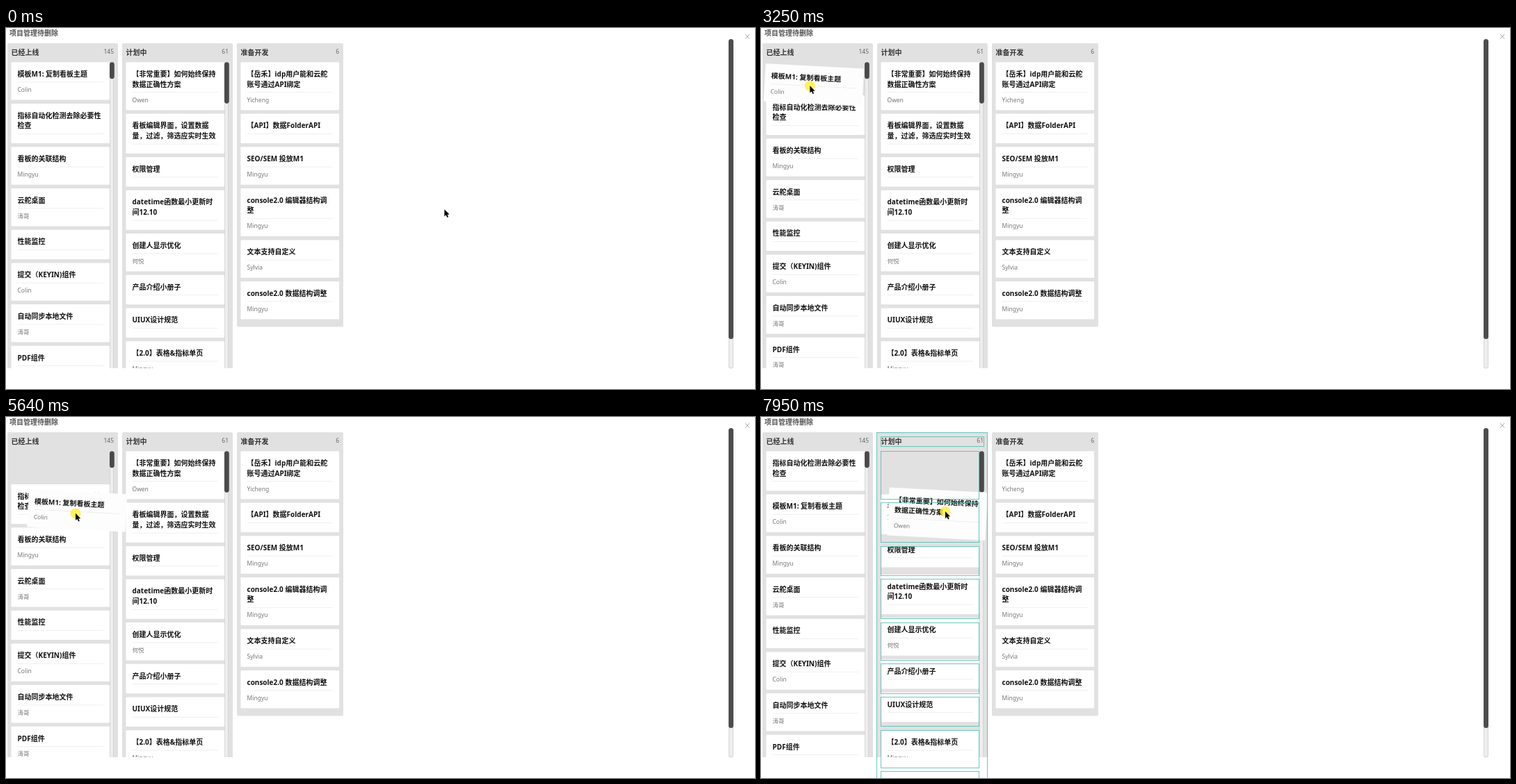
Animation, 1077 px wide and 520 px high, one loop 7.99 s. Source, as an HTML page with a canvas:

```html
<!DOCTYPE html>
<html lang="zh-CN">
<head>
<meta charset="utf-8">
<style>
  html, body { margin: 0; width: 100%; height: 100%; overflow: hidden; background: #fff; }
  canvas { display: block; width: 1077px; height: 520px; }
</style>
</head>
<body>
<canvas id="stage"></canvas>
<script>
const W = 1077, H = 520, LOOP = 7990, BOTTOM = 490;
const FONT = '"Noto Sans", "Noto Sans CJK SC", "Noto Sans CJK", sans-serif';
const CARD_W = 141.6, GAP = 5.3, LINE = 14.7, NAME_H = 12, TOP = 49.2;
const GRAB_1 = 2080, DROP_1 = 6600, GRAB_2 = 7780;

const canvas = document.getElementById('stage');
const ctx = canvas.getContext('2d');
const dpr = window.devicePixelRatio || 1;
canvas.width = W * dpr;
canvas.height = H * dpr;

const card = (title, name) => ({ lines: title.split('\n'), name });
const columns = [
  { x: 2, w: 159, bottom: BOTTOM, title: '已经上线', count: '145', thumb: 24, cards: [
    card('模板M1: 复制看板主题', 'Colin'),
    card('指标自动化检测去除必要性\n检查'),
    card('看板的关联结构', 'Mingyu'),
    card('云舵桌面', '涛哥'),
    card('性能监控'),
    card('提交（KEYIN)组件', 'Colin'),
    card('自动同步本地文件', '涛哥'),
    card('PDF组件', '涛哥'),
    card('')
  ] },
  { x: 167, w: 159, bottom: BOTTOM, title: '计划中', count: '61', thumb: 59.5, cards: [
    card('【非常重要】如何始终保持\n数据正确性方案', 'Owen'),
    card('看板编辑界面，设置数据\n量，过滤，筛选应实时生效'),
    card('权限管理'),
    card('datetime函数最小更新时\n间12.10'),
    card('创建人显示优化', '何悦'),
    card('产品介绍小册子'),
    card('UIUX设计规范'),
    card('【2.0】表格&指标单页', 'Mingyu'),
    card('')
  ] },
  { x: 332, w: 153, bottom: 430.5, title: '准备开发', count: '6', cards: [
    card('【岳禾】idp用户能和云舵\n账号通过API绑定', 'Yicheng'),
    card('【API】数据FolderAPI'),
    card('SEO/SEM 投放M1', 'Mingyu'),
    card('console2.0 编辑器结构调\n整', 'Mingyu'),
    card('文本支持自定义', 'Sylvia'),
    card('console2.0 数据结构调整', 'Mingyu')
  ] }
];

// time, x, y of the pointer tip
const pointerPath = [
  [0, 630, 261], [500, 630, 261], [1330, 82, 126], [1750, 76, 81], [2300, 76, 81],
  [2860, 74, 79], [3000, 81, 79], [3250, 70, 83], [3450, 68, 121], [3630, 75, 165],
  [3900, 69, 90], [4440, 83, 231], [4930, 104, 306], [4990, 104.5, 306],
  [5260, 105, 209], [6090, 86, 82], [6230, 78.5, 72], [6520, 99.5, 110],
  [6900, 99.5, 110], [7600, 254, 80], [7760, 254, 80], [7950, 264.5, 135.5], [7990, 266, 140]
];
// time and offset from the pointer to the middle of the held card
const holdPath1 = [[2080, 2, -5], [3250, 6, -1], [4970, 1.8, -5], [6230, 3, -3], [6600, 2, -5]];
const holdPath2 = [[7780, -11, 4], [7990, -11, 4]];

const height = (c, bare) => 27.7 + c.lines.length * LINE + (c.name && !bare ? NAME_H : 0);

// Monotone cubic through the key points
function follow(path, t) {
  const last = path.length - 1;
  if (t <= path[0][0]) return path[0].slice(1);
  if (t >= path[last][0]) return path[last].slice(1);
  let i = 0;
  while (path[i + 1][0] < t) i++;
  const slope = (k, a) => (path[k + 1][a] - path[k][a]) / (path[k + 1][0] - path[k][0]);
  const tangent = (k, a) => {
    if (k === 0 || k === last) return 0;
    const p = slope(k - 1, a), q = slope(k, a);
    return p * q <= 0 ? 0 : 2 * p * q / (p + q);
  };
  const d = path[i + 1][0] - path[i][0], u = (t - path[i][0]) / d;
  return [1, 2].map(a =>
    (1 + 2 * u) * (1 - u) ** 2 * path[i][a] + u * (1 - u) ** 2 * d * tangent(i, a) +
    u * u * (3 - 2 * u) * path[i + 1][a] + u * u * (u - 1) * d * tangent(i + 1, a));
}

function text(s, x, y, size, color, bold, align = 'left') {
  ctx.font = `${bold ? 'bold ' : ''}${size}px ${FONT}`;
  ctx.fillStyle = color;
  ctx.textAlign = align;
  ctx.fillText(s, x, y);
}

function box(x, y, w, h, r, color) {
  ctx.fillStyle = color;
  ctx.beginPath();
  ctx.roundRect(x, y, w, h, r);
  ctx.fill();
}

function clipTo(x, y, w, h) {
  ctx.beginPath();
  ctx.rect(x, y, w, h);
  ctx.clip();
}

function drawCard(c, x, y, fill = '#fff') {
  box(x, y, CARD_W, height(c), 1, fill);
  c.lines.forEach((s, i) => text(s, x + 9, y + 20.7 + i * LINE, 10, '#111', true));
  const ruleY = y + 13.7 + c.lines.length * LINE;
  ctx.fillStyle = '#ececec';
  ctx.fillRect(x + 9, ruleY, CARD_W - 18, 0.8);
  if (c.name) text(c.name, x + 9, ruleY + 14.2, 8.5, '#777');
}

// held: index of the lifted card, slot: index after which the drop gap opens,
// stale: parts of the column have not been repainted yet
function drawCards(col, { cards = col.cards, held = -1, slot = -1, stale = false }) {
  ctx.save();
  clipTo(col.x, TOP - 1, col.w, col.bottom - TOP + 1);
  let y = TOP, oldY = TOP;
  cards.forEach((c, i) => {
    const h = height(c);
    if (i !== held) {
      ctx.save();
      if (stale && i === slot) clipTo(col.x, oldY, col.w, h);
      drawCard(c, col.x + 5.5, stale && i > 6 ? oldY : y);
      ctx.restore();
    }
    y += height(c, i === held) + GAP + (i === slot ? GAP : 0);
    oldY += h + GAP;
  });
  ctx.restore();
}

function drawColumn(col, state) {
  const right = col.x + col.w;
  box(col.x, 22, col.w, col.bottom - 22, col.thumb ? [2, 2, 0, 0] : 2, '#e1e1e1');
  text(col.title, col.x + 5.5, 39.3, 10, '#333', true);
  text(col.count, right - 6, 37.2, 8.5, '#666', false, 'right');
  if (col.thumb) {
    box(right - 12, TOP, 6, BOTTOM - TOP, [3, 3, 0, 0], '#cfcfcf');
    box(right - 11.2, TOP, 4.4, BOTTOM - TOP, [2, 2, 0, 0], '#eeeeee');
  }
  drawCards(col, state);
  if (col.thumb) box(right - 12, TOP, 6.8, col.thumb, 3.4, '#4a4a4a');
}

function drawFlash(col, age) {
  if (age < 0 || age > 500) return;
  const snap = v => Math.floor(v) + 0.5;
  const outline = (x, y, w, h) =>
    ctx.strokeRect(snap(x), snap(y), snap(x + w) - snap(x), snap(y + h) - snap(y));
  ctx.save();
  ctx.globalAlpha = Math.min(1, 1.25 - age / 400);
  ctx.strokeStyle = '#4fbdb0';
  ctx.lineWidth = 1;
  outline(col.x - 0.5, 22, col.w, H);
  outline(col.x + 5.5, 28, col.w - 11.5, 14.5);
  let y = TOP;
  for (const c of col.cards) {
    outline(col.x + 5.5, y, CARD_W - 0.6, height(c));
    y += height(c) + GAP;
  }
  ctx.restore();
}

function drawHeld(c, [px, py], [dx, dy]) {
  ctx.save();
  ctx.translate(px + dx, py + dy);
  ctx.rotate(3 * Math.PI / 180);
  drawCard(c, -CARD_W / 2, -height(c) / 2, '#fdfdfd');
  ctx.restore();
}

function drawPointer([x, y], pressed) {
  if (pressed) {
    ctx.fillStyle = 'rgba(255, 238, 50, 0.78)';
    ctx.beginPath();
    ctx.arc(x + 0.3, y + 0.5, 7.5, 0, Math.PI * 2);
    ctx.fill();
  }
  const shape = [[0, 0], [0, 10.2], [2.3, 8], [4, 11.6], [5.7, 10.8], [4.1, 7.4], [7.2, 7.3]];
  ctx.fillStyle = '#000';
  ctx.beginPath();
  shape.forEach(([a, b]) => ctx.lineTo(x + a + 0.4, y + b + 0.3));
  ctx.fill();
}

function drawFrame() {
  text('项目管理待删除', 5, 10.7, 10, '#555', true);
  ctx.strokeStyle = '#999';
  ctx.lineWidth = 0.9;
  ctx.beginPath();
  ctx.moveTo(1063, 9); ctx.lineTo(1069, 15.5);
  ctx.moveTo(1069, 9); ctx.lineTo(1063, 15.5);
  ctx.stroke();
  box(1039, 16, 7, 474.5, 3.5, '#d2d2d2');
  box(1039.8, 17, 5.4, 472.5, 2.7, '#eeeeee');
  box(1039, 16, 7, 432, 3.5, '#4d4d4d');
}

function render(t) {
  const [live, plan, ready] = columns;
  const drag1 = t >= GRAB_1 && t < DROP_1, drag2 = t >= GRAB_2;
  const pointer = follow(pointerPath, t);

  ctx.setTransform(dpr, 0, 0, dpr, 0, 0);
  ctx.fillStyle = '#fff';
  ctx.fillRect(0, 0, W, H);
  drawFrame();

  const [first, second, ...rest] = live.cards;
  drawColumn(live, {
    cards: t < DROP_1 ? live.cards : [second, first, ...rest],
    held: drag1 ? 0 : -1,
    slot: drag1 && t >= 6150 ? 1 : -1
  });
  drawColumn(plan, drag2 ? { held: 0, slot: 2, stale: true } : {});
  drawColumn(ready, {});

  if (drag1) drawHeld(first, pointer, follow(holdPath1, t));
  if (drag2) drawHeld(plan.cards[0], pointer, follow(holdPath2, t));
  drawFlash(live, t - GRAB_1);
  drawFlash(live, t - DROP_1);
  drawFlash(plan, t - GRAB_2);
  drawPointer(pointer, (t >= 1800 && t < DROP_1) || t >= 7740);
}

const start = performance.now();
function tick() {
  render((performance.now() - start) % LOOP);
  requestAnimationFrame(tick);
}
tick();
</script>
</body>
</html>
```
